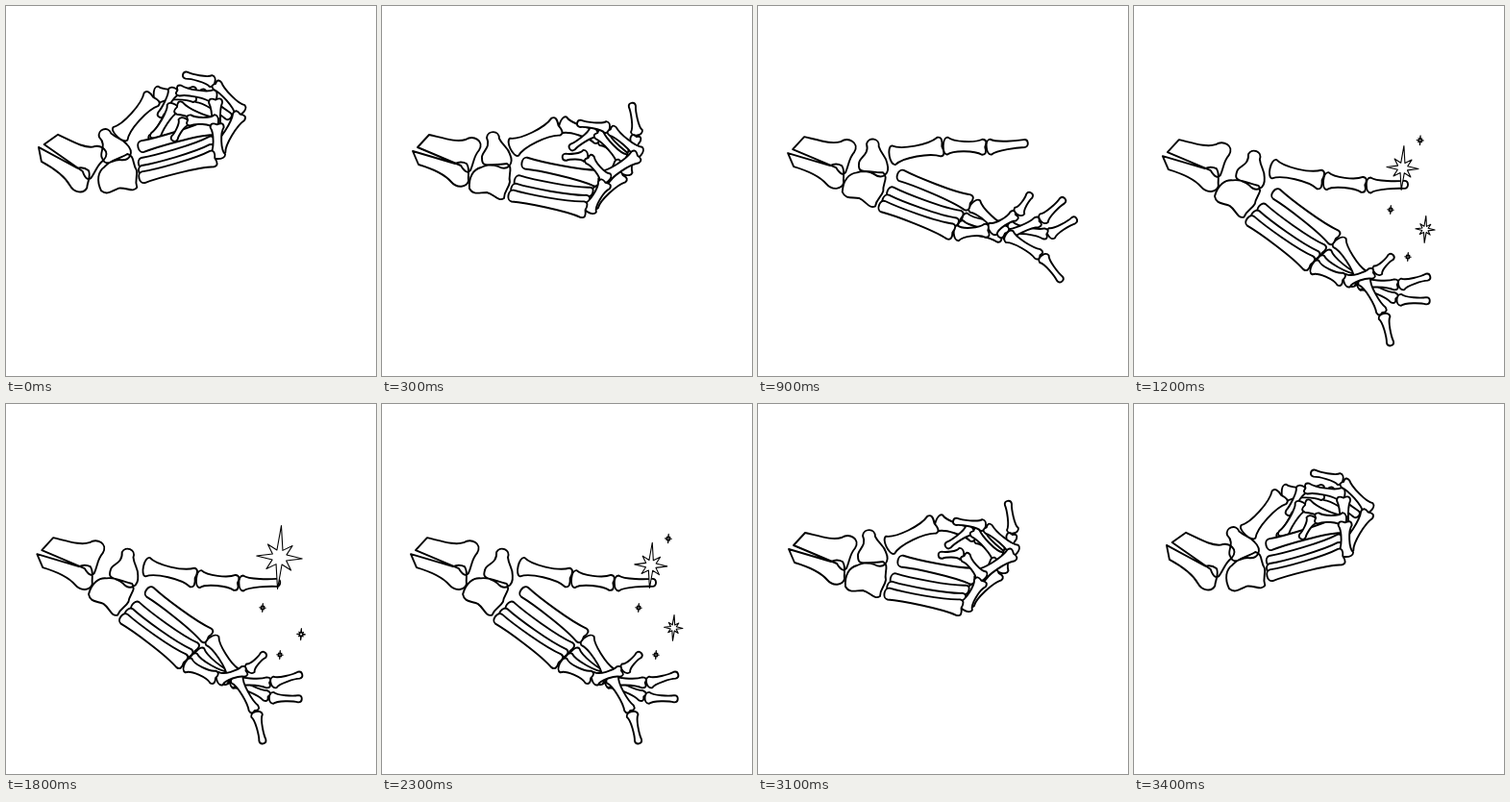
Recreate the animation shown at these times as an HTML page with a canvas. Size 385 px wide and 385 px high, loop 3.6 s.

```html
<!DOCTYPE html>
<html lang="en">
<head>
<meta charset="utf-8">
<title>Skeleton hand snap</title>
<style>
  html, body { margin: 0; width: 100%; height: 100%; overflow: hidden; background: #fff; }
  canvas { display: block; width: 100vw; height: 100vh; }
</style>
</head>
<body>
<canvas id="stage" width="385" height="385"></canvas>
<script>
const ctx = document.getElementById('stage').getContext('2d');
const LOOP = 3600, RAD = Math.PI / 180;

const forearm = new Path2D(`M37 147L49 134C66 138 78 142 87 139C95 134 107 140 101 150C95 157 96 162 92 171Q88 176 82 166Z
  M32 151L38 165C55 170 65 175 72 183C78 190 88 189 90 182C89 176 92 170 88 164Q82 161 76 164Z`);
const wrist = new Path2D(`M109 137C110 129 122 129 122 138C126 146 131 147 133 154C138 165 130 172 121 167C112 163 104 170 104 158C103 152 114 148 109 137Z
  M91 190C90 178 95 170 103 168C112 163 122 166 130 164C137 168 131 176 133 183C132 190 127 192 127 200C121 204 117 196 109 194C101 194 95 197 91 190Z`);

// A bone along the x axis: half widths of base, shaft and tip; the last of a finger is round
function bone(len, [base, shaft, tip], last) {
  const a = len * .22, b = len * .75, end = len - 3;
  const cap = last
    ? `C${len + 2} ${-tip} ${len + 2} ${tip} ${end} ${tip}`
    : `Q${len + 3} ${-tip} ${len} 0Q${len + 3} ${tip} ${end} ${tip}`;
  return { len, path: new Path2D(`M3 ${-base}C${a} ${-shaft} ${b} ${-shaft} ${end} ${-tip}${cap}
    C${b} ${shaft} ${a} ${shaft} 3 ${base}C-3 ${base} -3 ${-base} 3 ${-base}Z`) };
}

const thumb = [bone(54, [10, 4, 10]), bone(42, [9, 4, 8]), bone(41, [8, 3.6, 4], true)];
// Four fingers from index to little; the little one is shorter
const fingers = [1, 1, 1, .76].map(size => [
  bone(80, [6, 4.5, 8.5]),
  bone(45 * size, [8, 3.2, 7]),
  bone(40 * size, [7, 2.6, 5.5]),
  bone(32 * size, [6, 2.4, 3.6], true)
]);
const palmSpread = [0, .55, .8, 1];
const layers = [1, 2, 0, 3];

// forearm and wrist: dx, dy, turn; thumb: x, y, joint angles;
// palm: x, y, angle of the index and little edges; curls: joint angles of each finger
const fist = {
  forearm: [-.5, 3, 12], wrist: [-2.5, -5, -21],
  thumb: [117, 135, -48, -1, 36],
  palm: [[139, 147, -16], [140, 179, -15]],
  curls: [[-155, -238, -420], [-92, -170, -241], [-58, -133, -167], [-91, -177, -240]]
};
const curled = {
  forearm: [0, 0, 0], wrist: [0, 0, 0],
  thumb: [135, 148, -26, 18, 38],
  palm: [[147, 163, 12], [133, 197, 11]],
  curls: [[-33, -140, -172], [-50, -133, -215], [-42, -73, -100], [-58, -130, -184]]
};
const open = {
  ...curled,
  thumb: [135, 147, -26, -1, -9],
  palm: [[147, 163, 12], [133, 198, 10]],
  curls: [[32, 12, 35], [-10, 0, -52], [0, -41, -62], [-25, -42, -65]]
};
const dropped = {
  forearm: [-2.2, 5.2, 0], wrist: [0, 18, 20],
  thumb: [143, 169, 13, 6, -1],
  palm: [[146, 194, 37], [119, 222, 36]],
  curls: [[57, 60, 77], [38, 24, 2], [28, 3, -16], [25, -17, -45]]
};
const keys = [[0, fist], [300, curled], [700, open], [1200, dropped], [2300, dropped],
  [2700, open], [3100, curled], [3400, fist], [LOOP, fist]];
const held = [1200, 1400, 1500, 1800, 2000, 2300, 2500];

// x, y, size, swing of the size
const stars = [[282, 164, 28, -5], [305, 236, 10, 4], [299, 142, 2.5, 2.5], [267, 212, 4.5, 0], [285, 261, 4.5, 0]];

function mix(a, b, u) {
  if (typeof a === 'number') return a + (b - a) * u;
  if (Array.isArray(a)) return a.map((v, i) => mix(v, b[i], u));
  return Object.fromEntries(Object.keys(a).map(k => [k, mix(a[k], b[k], u)]));
}

function poseAt(t) {
  const i = keys.findIndex(([at]) => at > t) - 1;
  const [[t0, a], [t1, b]] = [keys[i], keys[i + 1]];
  return mix(a, b, (t - t0) / (t1 - t0));
}

function place(x, y, angle, paint) {
  ctx.save();
  ctx.translate(x, y);
  ctx.rotate(angle * RAD);
  paint();
  ctx.restore();
}

function drawPlate(path, [dx, dy, turn], px, py) {
  place(px + dx, py + dy, turn, () => {
    ctx.translate(-px, -py);
    ctx.stroke(path);
  });
}

// Bones joined end to end, painted from the tip back to the root
function drawChain(bones, [x, y, ...angles]) {
  const joints = bones.map(({ len, path }, i) => {
    const joint = { x, y, path, angle: angles[i] };
    x += (len + 3) * Math.cos(angles[i] * RAD);
    y += (len + 3) * Math.sin(angles[i] * RAD);
    return joint;
  });
  for (const j of joints.reverse()) {
    place(j.x, j.y, j.angle, () => {
      ctx.fill(j.path);
      ctx.stroke(j.path);
    });
  }
}

function drawHand(pose) {
  drawPlate(forearm, pose.forearm, 67, 159);
  drawPlate(wrist, pose.wrist, 116, 165);
  drawChain(thumb, pose.thumb);
  for (const f of layers) {
    drawChain(fingers[f], [...mix(...pose.palm, palmSpread[f]), ...pose.curls[f]]);
  }
}

function drawStar([x, y, size, swing], wave) {
  const r = size + swing * wave;
  if (r < 1) return;
  ctx.beginPath();
  for (let i = 0; i < 16; i++) {
    const a = i * Math.PI / 8 + .06;
    const reach = r * (i % 2 ? .24 : i % 8 === 4 ? 1 : i % 4 ? .55 : .72);
    ctx.lineTo(x - Math.abs(swing) * wave / 2 + Math.cos(a) * reach,
      y - swing * wave * .9 + Math.sin(a) * reach);
  }
  ctx.closePath();
  ctx.fill();
  ctx.stroke();
}

function draw(now) {
  const t = now % LOOP;
  const down = t >= 1200 && t < 2700;
  const step = down ? held.findLast(at => at <= t) : Math.floor(t / 100) * 100;
  const wave = Math.cos((step - 1200) / 1200 * 2 * Math.PI);
  const sparkling = down && step < 2500;

  ctx.fillStyle = '#fff';
  ctx.fillRect(0, 0, 385, 385);
  ctx.strokeStyle = '#000';
  ctx.lineJoin = 'round';
  ctx.lineWidth = 1.9;
  ctx.save();
  if (sparkling) {
    // The wrist sways while the fingertips stay put
    ctx.translate(310, 0);
    ctx.scale(1 - 1.25 * (1 - wave) / 280, 1);
    ctx.translate(-310, 0);
  }
  drawHand(poseAt(step));
  ctx.restore();

  ctx.lineWidth = 1.1;
  if (sparkling) stars.forEach(star => drawStar(star, wave));
}

const start = performance.now();
function tick() {
  draw(performance.now() - start);
  requestAnimationFrame(tick);
}
tick();
</script>
</body>
</html>
```
